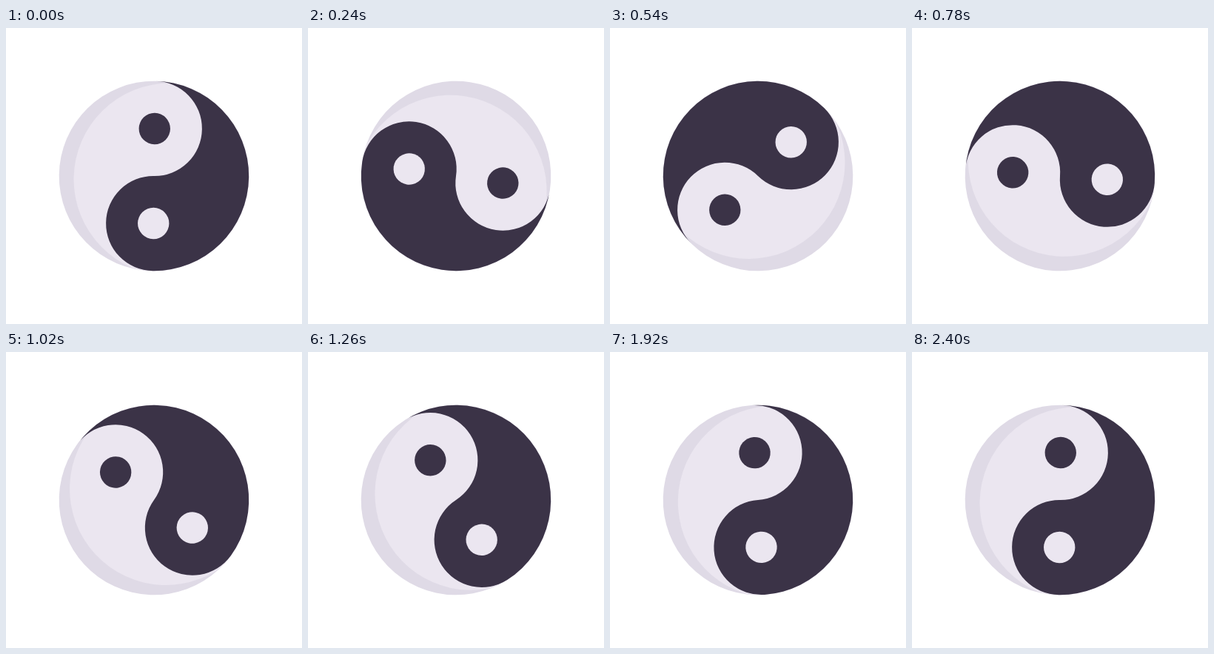
Recreate the animation shown at these times as an HTML page. Size 400 px wide and 400 px high, loop 3.46 s.

```html
<!DOCTYPE html>
<html lang="en">
<head>
<meta charset="utf-8">
<title>Yin and yang</title>
<style>
  html, body { margin: 0; height: 100%; overflow: hidden; background: #fff; }
  svg { display: block; width: 100%; height: 100%; }
  .light { fill: #ebe6f0; }
  .shade { fill: #dfdae6; }
  .dark { fill: #3b3347; }
</style>
</head>
<body>
<svg viewBox="-200 -200 400 400">
  <clipPath id="disc"><circle r="128.3"/></clipPath>
  <g id="symbol">
    <circle class="shade" r="128.3"/>
    <g clip-path="url(#disc)">
      <circle class="light" cx="21.6" cy="4.2" r="130"/>
    </g>
    <path class="dark" d="M0-128.2A128.2 128.2 0 0 1 0 128.2A64.1 64.1 0 0 1 0 0A64.1 64.1 0 0 0 0-128.2"/>
    <circle class="dark" cy="-64" r="21.2"/>
    <circle class="light" cy="64" r="21.2"/>
  </g>
</svg>
<script>
const LOOP = 3460, SPIN = 2400, STEP = 30, START = 0.7;
const symbol = document.getElementById('symbol');

// One axis of a cubic Bezier from 0 to 1
const bezier = (s, a, b) => 3 * (1 - s) ** 2 * s * a + 3 * (1 - s) * s * s * b + s ** 3;

// Brisk linear start, long soft stop
function ease(x) {
  if (x >= 1) return 1;
  let lo = 0, hi = 1;
  for (let i = 0; i < 30; i++) {
    const mid = (lo + hi) / 2;
    if (bezier(mid, 0.167, 0.02) < x) lo = mid;
    else hi = mid;
  }
  return bezier(lo, 0.167, 1);
}

function draw(now) {
  const time = Math.floor(now % LOOP / STEP) * STEP;
  const angle = START + 360 * ease(time / SPIN);
  symbol.setAttribute('transform', `rotate(${angle})`);
}

const begin = performance.now();
function tick() {
  draw(performance.now() - begin);
  requestAnimationFrame(tick);
}
tick();
</script>
</body>
</html>
```
